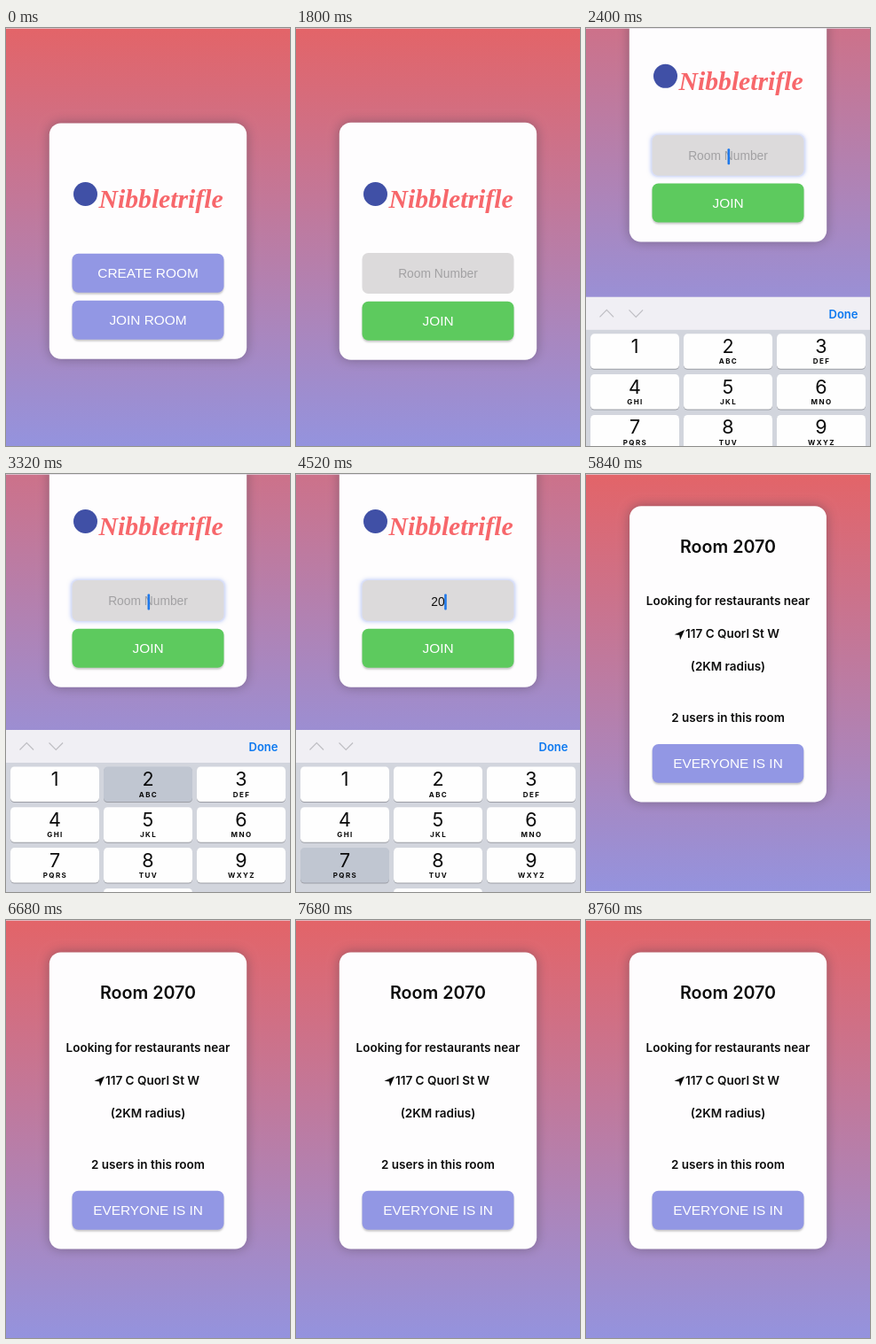
An HTML page with a canvas for the animation above (8.8 s loop, 320 by 472 pixels).

```html
<!DOCTYPE html>
<html lang="en">
<head>
<meta charset="utf-8">
<title>Join a room</title>
<style>
  html, body { margin: 0; width: 100%; height: 100%; overflow: hidden; }
  canvas { display: block; width: 320px; height: 472px; }
</style>
</head>
<body>
<canvas id="stage"></canvas>
<script>
const W = 320, H = 472, LOOP = 8800;
const JOIN_FORM = 1200, FOCUS = 2140, ENTER = 5460;
const KEYBOARD_TOP = 289, SCROLL = 134, PRESS = 120;
const TAPS = [[3320, '2'], [3880, '0'], [4480, '7'], [4960, '0']];
const LETTERS = ['', 'ABC', 'DEF', 'GHI', 'JKL', 'MNO', 'PQRS', 'TUV', 'WXYZ'];
const SANS = '"Liberation Sans", Arial, sans-serif';
const UI = 'Inter, sans-serif';
const VIOLET = '#9297e4', GREEN = '#5dca5e';

const canvas = document.getElementById('stage');
const ctx = canvas.getContext('2d');
const dpr = window.devicePixelRatio || 1;
canvas.width = W * dpr;
canvas.height = H * dpr;

// Ease-out progress from 0 to 1
function ease(t, start, duration) {
  const u = Math.min(1, Math.max(0, (t - start) / duration));
  return 1 - (1 - u) ** 3;
}

function box(x, y, w, h, r, fill, shadow) {
  ctx.save();
  if (shadow) {
    const scale = ctx.getTransform().a;
    ctx.shadowColor = shadow.color;
    ctx.shadowBlur = shadow.blur * scale;
    ctx.shadowOffsetY = (shadow.dy || 0) * scale;
  }
  ctx.fillStyle = fill;
  ctx.beginPath();
  ctx.roundRect(x, y, w, h, r);
  ctx.fill();
  ctx.restore();
}

function text(str, x, y, font, color, align = 'center', spacing = 0) {
  ctx.font = font;
  ctx.fillStyle = color;
  ctx.textAlign = align;
  ctx.letterSpacing = spacing + 'px';
  ctx.fillText(str, x, y);
  ctx.letterSpacing = '0px';
}

function polyline(points) {
  ctx.beginPath();
  points.forEach(([x, y]) => ctx.lineTo(x, y));
}

function card(y, h) {
  box(48.8, y, 222.4, h, 13, '#fefdfe', { color: 'rgba(70,60,75,.48)', blur: 13 });
}

function button(label, y, color) {
  box(74.5, y, 171, 44, 7, color, { color: 'rgba(0,0,0,.2)', blur: 2, dy: 2 });
  text(label, 160, y + 27.2, '15.4px ' + SANS, '#fff');
}

function background(scroll) {
  const g = ctx.createLinearGradient(0, -scroll, 0, H - scroll);
  g.addColorStop(0, '#e36468');
  g.addColorStop(1, '#9493de');
  ctx.fillStyle = g;
  ctx.fillRect(0, 0, W, H);
}

function brand() {
  ctx.fillStyle = '#4050a6';
  ctx.beginPath();
  ctx.arc(89.5, 187.5, 13.5, 0, Math.PI * 2);
  ctx.fill();
  text('Nibbletrifle', 104.5, 203, 'italic bold 29.7px "Liberation Serif", serif', '#f7676b', 'left');
}

function roomInput(t) {
  const focused = t >= FOCUS;
  const typed = TAPS.filter(([at]) => t >= at + PRESS);
  const value = typed.map(tap => tap[1]).join('');
  if (focused) {
    box(73, 253, 174, 48, 8, '#d9dff8', { color: '#bccaf8', blur: 4 });
  }
  box(74.5, 254, 171, 46, 7, '#dcdadb');

  const font = '13.8px ' + SANS;
  if (value) text(value, 160, 283, font, '#111');
  else text('Room Number', 160, 281.8, font, '#a2a1a3');

  const since = typed.length ? typed[typed.length - 1][0] + PRESS : FOCUS + 60;
  if (focused && t >= since && (t - since) % 1000 < 530) {
    ctx.font = font;
    const end = 160 + ctx.measureText(value).width / 2;
    box(end - 0.5, 269.5, 2.6, 18, 1, '#1f78ea');
  }
}

function lobby(t) {
  if (t < JOIN_FORM) {
    card(107.5, 266.2);
    button('CREATE ROOM', 254.7, VIOLET);
    button('JOIN ROOM', 307.7, VIOLET);
  } else {
    card(106.7, 268);
    roomInput(t);
    button('JOIN', 308.7, GREEN);
  }
  brand();
}

function room(t) {
  const s = ease(t, ENTER, 440);
  ctx.translate(160, 204);
  ctx.scale(s, s);
  ctx.translate(-160, -204);
  card(36.5, 335);
  const bold = '600 13.5px ' + UI;
  text('Room 2070', 160, 89, '600 19.7px ' + UI, '#0c0c0c');
  text('Looking for restaurants near', 160, 149, bold, '#0c0c0c');
  text('117 C Quorl St W', 112, 186, bold, '#0c0c0c', 'left');
  polyline([[111, 176.5], [99.5, 181.8], [105, 182.6], [106, 188]]);
  ctx.fill();
  text('(2KM radius)', 160, 222.5, bold, '#0c0c0c');
  text('2 users in this room', 160, 280.5, bold, '#0c0c0c');
  button('EVERYONE IS IN', 305.8, VIOLET);
}

function keyboard(t, top) {
  ctx.fillStyle = '#d2d5dd';
  ctx.fillRect(0, top, W, H);
  ctx.fillStyle = '#f0eff4';
  ctx.fillRect(0, top, W, 37);

  ctx.strokeStyle = '#bebec3';
  ctx.lineWidth = 1.2;
  for (const [x, dir] of [[15.5, 1], [48.5, -1]]) {
    const y = top + 18.5;
    polyline([[x, y + 4 * dir], [x + 7.8, y - 4 * dir], [x + 15.6, y + 4 * dir]]);
    ctx.stroke();
  }
  text('Done', 306.5, top + 24, '600 13px ' + UI, '#0b78f0', 'right');

  const tap = TAPS.find(([at]) => t >= at && t < at + PRESS);
  const pressed = tap && tap[1];
  const key = (digit, letters, col, row) => {
    const x = 5 + col * 105, y = top + 41.5 + row * 45.8;
    box(x, y + 1, 100, 39.5, 4.5, '#9c9ea5');
    box(x, y, 100, 39.5, 4.5, digit === pressed ? '#c0c6d1' : '#fefefe');
    text(digit, x + 50, y + 21.5, '21.5px ' + UI, '#0a0a0a');
    text(letters, x + 50.5, y + 34, '700 8px ' + UI, '#0a0a0a', 'center', 1.4);
  };
  LETTERS.forEach((letters, i) => key(String(i + 1), letters, i % 3, Math.floor(i / 3)));
  key('0', '', 1, 3);
}

function draw(t) {
  const open = ease(t, FOCUS, 460) - ease(t, ENTER, 460);
  const scroll = SCROLL * (ease(t, FOCUS, 320) - ease(t, ENTER, 460));
  ctx.setTransform(dpr, 0, 0, dpr, 0, 0);
  background(scroll);

  ctx.save();
  ctx.translate(0, -scroll);
  if (t < ENTER) lobby(t);
  else if (t > ENTER) room(t);
  ctx.restore();

  // Pale hairline along the top edge
  ctx.fillStyle = 'rgba(225,220,228,.7)';
  ctx.fillRect(0, 0, W, 1);
  if (open > 0) keyboard(t, H - (H - KEYBOARD_TOP) * open);
}

const began = performance.now();
function tick() {
  draw((performance.now() - began) % LOOP);
  requestAnimationFrame(tick);
}
tick();
</script>
</body>
</html>
```
